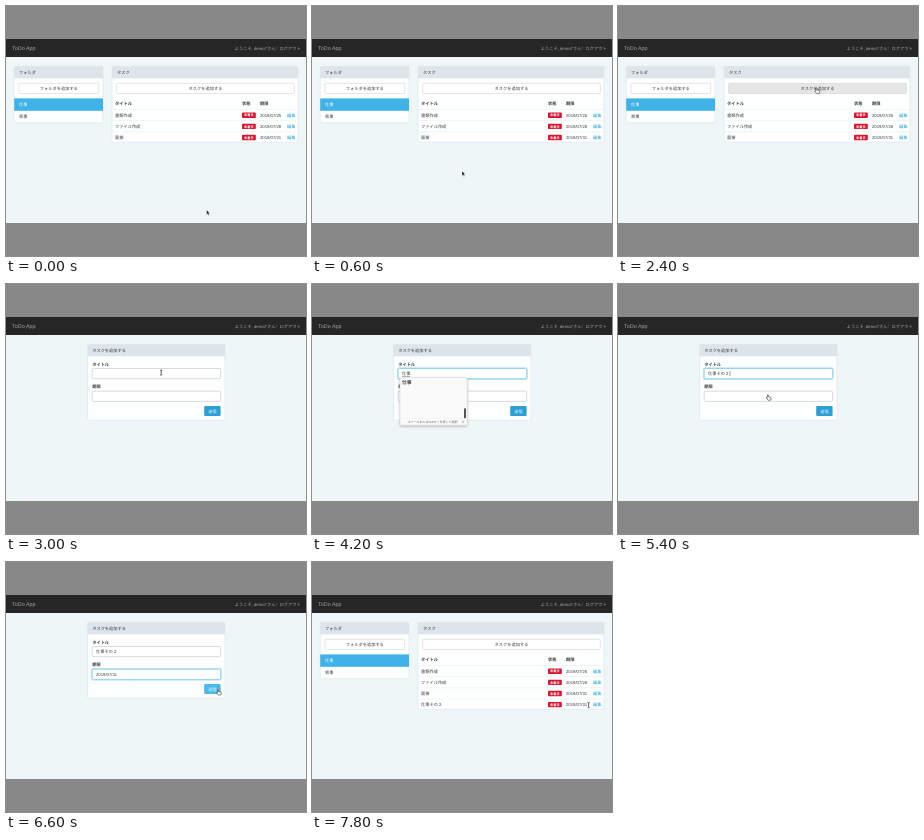
Recreate the animation shown at these times as an HTML page. Size 300 by 250 pixels, loop 8 s.

```html
<!DOCTYPE html>
<html lang="ja">
<head>
<meta charset="utf-8">
<title>ToDo App</title>
<style>
html, body { margin: 0; width: 100%; height: 100%; overflow: hidden; background: #888; }
svg { display: block; width: 300px; height: 250px; }
text {
  font-family: "Liberation Sans", "Noto Sans CJK JP", "Noto Sans CJK", sans-serif;
  text-rendering: geometricPrecision;
  white-space: pre;
}
</style>
</head>
<body>
<svg id="stage" viewBox="0 0 300 250" xmlns="http://www.w3.org/2000/svg"></svg>
<script>
const STEP = 600, LOOP = 8000, FONT = 4.23;
const INK = '#3a3e42', BLUE = '#3fb2e8', LINE = '#dfe5e9', PICK = '#42a5f5';

const rect = (x, y, w, h, fill, extra = '') =>
  `<rect x="${x}" y="${y}" width="${w}" height="${h}" fill="${fill}" ${extra}/>`;

// y is the vertical middle of the text
const text = (x, y, s, o = {}) => {
  const size = o.size || FONT;
  return `<text x="${x}" y="${y + size * 0.37}" font-size="${size}" fill="${o.fill || INK}"` +
    ` text-anchor="${o.anchor || 'start'}" font-weight="${o.bold ? 700 : 400}">${s}</text>`;
};

const mid = (x, y, s, o) => text(x, y, s, { ...o, anchor: 'middle' });

const panel = (x, w, h, title, tx) =>
  rect(x, 60.3, w, h, '#fdfefe', 'rx=".8" stroke="#d5dde3" stroke-width=".5"') +
  rect(x, 60.3, w, 12, '#dde4ea') +
  text(tx, 66.3, title);

const button = (x, w, label, hover) =>
  rect(x, 77.3, w, 10.2, hover ? '#e6e6e6' : '#fff', 'rx="1.1" stroke="#c6cacd" stroke-width=".5"') +
  mid(x + w / 2, 82.4, label);

const shell = () =>
  rect(0, 0, 300, 250, '#888') +
  rect(0, 33, 300, 184, '#eff6f8') +
  rect(0, 33, 300, 18, '#262626') +
  text(6, 42, 'ToDo App', { size: 5.45, fill: '#a0a0a0' }) +
  text(228.8, 42, 'ようこそ, demo7さん', { fill: '#a8a8a8' }) +
  rect(269.9, 40.5, 0.4, 3, '#777') +
  text(273.5, 42, 'ログアウト', { fill: '#a8a8a8' });

const tasks = [
  ['書類作成', '2019/07/25'],
  ['ファイル作成', '2019/07/28'],
  ['面接', '2019/07/31'],
  ['仕事その２', '2019/07/31']
];

function taskRow([name, due], i) {
  const y = 109.2 + i * 11.1;
  return rect(106.3, y - 5.7, 185.4, 0.4, LINE) +
    text(109, y, name) +
    rect(236, y - 2.6, 13.8, 5.4, '#d9152f', 'rx=".8"') +
    mid(242.9, y + 0.1, '未着手', { size: 3.2, fill: '#fff', bold: 1 }) +
    text(254, y, due) +
    text(281, y, '編集', { fill: '#2ba3dd' });
}

function listPage({ rows = 3, hover }) {
  return panel(8.2, 88.8, 56.5, 'フォルダ', 13) +
    button(13, 79.7, 'フォルダを追加する') +
    rect(8.2, 92.4, 88.8, 12.4, BLUE) +
    text(13, 98.6, '仕事', { fill: '#fff' }) +
    text(13, 110.7, '家事') +
    panel(106, 186, 42.3 + rows * 11.2, 'タスク', 111) +
    button(110.7, 177.6, 'タスクを追加する', hover) +
    text(109, 97.4, 'タイトル', { bold: 1 }) +
    text(236, 97.4, '状態', { bold: 1 }) +
    text(254, 97.4, '期限', { bold: 1 }) +
    tasks.slice(0, rows).map(taskRow).join('');
}

function field(y, value, focus) {
  const glow = focus ? rect(85.4, y - 0.8, 130, 11.8, 'none', 'rx="1.6" stroke="#c2e6f7" stroke-width="1"') : '';
  return glow +
    rect(86.2, y, 128.4, 10.2, '#fff', `rx="1.1" stroke="${focus ? '#53b9e6' : '#bcc5cd'}" stroke-width=".6"`) +
    text(90, y + 5.1, value);
}

// Input method candidates: a tall list while typing, a short one once converted
function candidates(words, h) {
  return rect(88, 93.7, 67.2, h, '#fafafa', 'rx="1" stroke="#c3c6c8" stroke-width=".4" filter="url(#soft)"') +
    words.map((w, i) => text(90, 98 + i * 7.5, w, { size: 4.8, bold: !i })).join('') +
    rect(152, 93.7 + h - 17, 2, 10, '#555', 'rx=".8"') +
    rect(88.2, 93.7 + h - 6.6, 66.8, 0.3, '#e2e2e2') +
    text(95.5, 93.7 + h - 3.5, 'スペースまたはTabキーを押して選択', { size: 3.05, fill: '#666' }) +
    text(149.5, 93.7 + h - 3.5, '≫', { size: 3.2, fill: '#555' });
}

function calendar() {
  const x0 = 86.2, y0 = 118.2, cw = 13.28, ch = 11.75;
  const top = y0 + 18.8;
  let s = rect(x0, y0, 93, 89.4, '#fff', 'rx="1.5" filter="url(#soft)"') +
    rect(x0, y0, 93, 18.8, PICK, 'rx="1.5"') +
    rect(x0, y0 + 10, 93, 8.8, PICK) +
    mid(x0 + 46.5, y0 + 5.4, '7月 2019', { size: 5.6, fill: '#fff' }) +
    mid(x0 + 5, y0 + 5.2, '‹', { size: 7, fill: '#fff' }) +
    mid(x0 + 88, y0 + 5.2, '›', { size: 7, fill: '#fff' });
  [...'日月火水木金土'].forEach((d, i) => {
    s += mid(x0 + cw * (i + 0.5), y0 + 14.3, d, { size: 3.8, fill: '#1e4c72', bold: 1 });
  });
  for (let i = 0; i < 42; i++) {
    const x = x0 + cw * (i % 7 + 0.5), y = top + ch * (Math.floor(i / 7) + 0.5);
    const day = i < 1 ? 30 : (i - 1) % 31 + 1;
    if (i === 31) s += `<circle cx="${x}" cy="${y}" r="5.7" fill="#e6e6e6"/>`;
    s += mid(x, y, day, { fill: i < 24 || i > 31 ? '#c9c9c9' : '#393939' });
  }
  return s;
}

function formPage({ title = '', due = '', focus, caret, compose, list, pick, hover }) {
  let s = panel(81.6, 137.4, 76, 'タスクを追加する', 86.2) +
    text(86.2, 80, 'タイトル', { bold: 1 }) +
    field(84.5, title, focus === 'title') +
    text(86.2, 102.4, '期限', { bold: 1 }) +
    field(107.2, due, focus === 'due') +
    rect(198.2, 121.9, 16.4, 10.2, hover ? '#4cb9ea' : '#2b9fd5', 'rx="1.1"') +
    mid(206.4, 127, '送信', { fill: '#fff' });
  const end = 90.2 + title.length * FONT;
  if (compose) s += rect(90, 92.2, end - 90.4, 0.4, '#444');
  if (caret) s += rect(end + 0.4, 87, 0.45, 5.2, '#333');
  if (list) s += candidates(...list);
  if (pick) s += calendar();
  return s;
}

const shapes = {
  arrow: '<path d="M0 0V4.7L1.1 3.7 1.9 5.4 2.7 5 1.9 3.4H3.3Z" fill="#111" stroke="#fff" stroke-width=".4"/>',
  beam: '<path d="M-1-2.6Q0-2.6 0-1.8 0-2.6 1-2.6M0-1.8V1.8M-1 2.6Q0 2.6 0 1.8 0 2.6 1 2.6" fill="none" stroke="#222" stroke-width=".7"/>',
  hand: '<path d="M0 0Q.6-.5 1 .2V2L3.4 2.6Q4 2.9 3.7 4L3.2 5.4H.6L-1.2 3.2Q-1.2 2.3 0 3Z" fill="#fff" stroke="#222" stroke-width=".55"/>'
};

const cursor = ([kind, x, y]) => `<g transform="translate(${x} ${y})">${shapes[kind]}</g>`;

const guesses = ['仕事', '仕事が', '仕事の', '仕事を', '仕事で', '仕事中', '仕事場', '仕事は'];
const done = '仕事その２';

// One entry per 600 ms: page, its state, pointer
const steps = [
  [listPage, {}, ['arrow', 200.6, 204]],
  [listPage, {}, ['arrow', 150, 165]],
  [listPage, {}, ['arrow', 62, 98]],
  [listPage, {}, ['arrow', 128.5, 110.6]],
  [listPage, { hover: 1 }, ['hand', 198, 82]],
  [formPage, {}, ['beam', 155.2, 88.6]],
  [formPage, { title: 'しごと', focus: 'title', compose: 1, list: [guesses, 68] }],
  [formPage, { title: '仕事', focus: 'title', compose: 1, list: [['仕事'], 47.5] }],
  [formPage, { title: '仕事その', focus: 'title', caret: 1 }],
  [formPage, { title: done, focus: 'title', caret: 1 }, ['hand', 149.4, 110.8]],
  [formPage, { title: done, focus: 'due', pick: 1 }, ['hand', 132.6, 190]],
  [formPage, { title: done, due: '2019/07/31', focus: 'due', hover: 1 }, ['hand', 211.6, 127.6]],
  [listPage, { rows: 4 }, ['arrow', 213, 129]],
  [listPage, { rows: 4 }, ['beam', 276.6, 143]]
];

const stage = document.getElementById('stage');
stage.innerHTML =
  '<defs><filter id="soft" x="-10%" y="-10%" width="120%" height="125%">' +
  '<feDropShadow dx="0" dy=".9" stdDeviation="1.2" flood-opacity=".3"/></filter></defs>' +
  shell() +
  steps.map(([page, state, mouse]) =>
    `<g class="step" display="none">${page(state)}${mouse ? cursor(mouse) : ''}</g>`).join('');

const views = stage.querySelectorAll('.step');
let shown = -1;

function draw() {
  const now = Math.floor(performance.now() % LOOP / STEP);
  if (now !== shown) {
    views.forEach((v, i) => v.setAttribute('display', i === now ? 'inline' : 'none'));
    shown = now;
  }
  requestAnimationFrame(draw);
}
draw();
</script>
</body>
</html>
```
